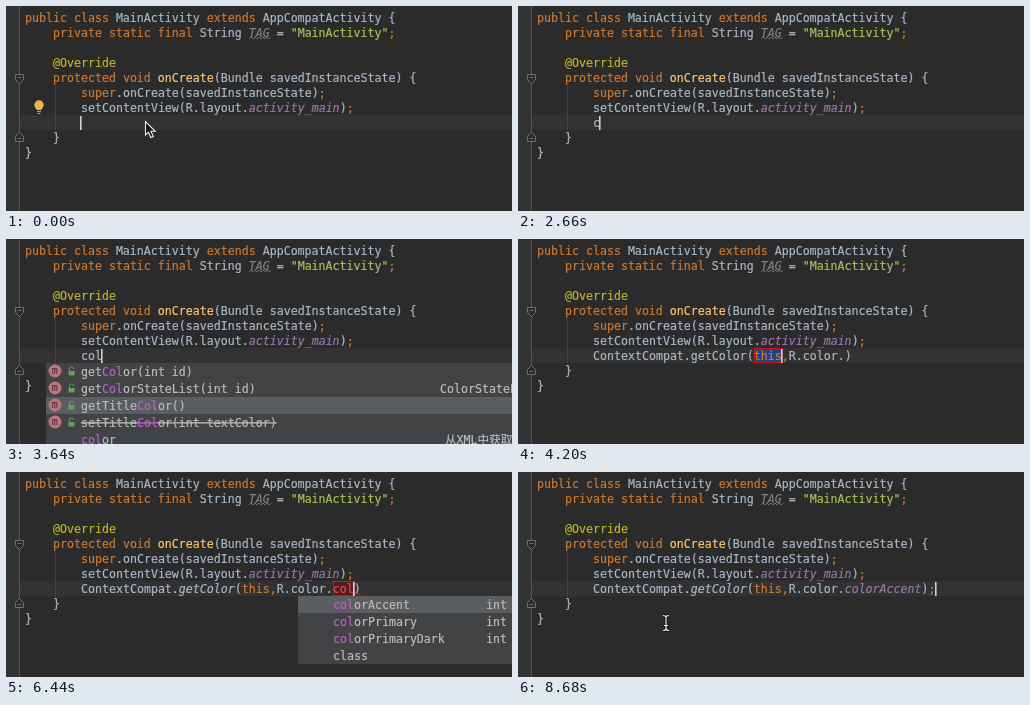
Animation, 506 px wide and 205 px high, one loop 8.75 s. Source, as an HTML page:

```html
<!DOCTYPE html>
<html lang="en">
<head>
<meta charset="utf-8">
<title>Code completion</title>
<style>
html, body { margin: 0; width: 100%; height: 100%; overflow: hidden; background: #2b2b2b; }
svg { display: block; }
text { font: 11.627px "DejaVu Sans Mono", "Noto Sans CJK SC", "Noto Sans CJK", monospace; white-space: pre; }
tspan { fill: currentColor; stroke: currentColor; stroke-width: .2; }
.n { color: #a9b7c6; }
.k { color: #cc7832; }
.m { color: #ffc66d; }
.a { color: #bbb529; }
.s { color: #a5c25c; }
.f { color: #9876aa; font-style: italic; }
.u { color: #808187; font-style: italic; }
.i { color: #a9b7c6; font-style: italic; }
.e { color: #d0504c; }
.d { color: #8d7a93; font-style: italic; }
.p { color: #bbbbbb; }
.h { color: #b964c4; }
.x { text-decoration: line-through; }
</style>
</head>
<body>
<svg width="506" height="205" viewBox="0 0 506 205">
  <path fill="#313335" d="M0 0h13v205H0z"/>
  <path fill="#323232" d="M0 109h506v15H0z"/>
  <path stroke="#555" d="M13.5 0v205"/>
  <path stroke="#414141" d="M49.5 80v44"/>
  <g fill="#2b2b2b" stroke="#707070">
    <path d="M9.5 68.5h8v5l-4 4l-4-4zM11.5 71.5h4"/>
    <path d="M9.5 135.500h8v-5l-4-4l-4 4zM11.5 132.500h4"/>
  </g>
  <g id="code"></g>
  <g id="live"></g>
</svg>
<script>
const LOOP = 8750, STEP = 70, CHAR = 7, LEFT = 75, BASE = 121;
const code = document.getElementById("code"), live = document.getElementById("live");

// Styled text: class, string, class, string, ...
function text(x, y, ...runs) {
  let out = "";
  for (let i = 0; i < runs.length; i += 2) out += `<tspan class="${runs[i]}">${runs[i + 1]}</tspan>`;
  return `<text x="${x}" y="${y}">${out}</text>`;
}
const line = (row, indent, ...runs) => text(19 + indent * CHAR, 16 + row * 15, ...runs);
const rect = (x, y, w, h, fill, more = "") =>
  `<rect x="${x}" y="${y}" width="${w}" height="${h}" fill="${fill}" ${more}/>`;
const column = n => LEFT + n * CHAR;
const field = (from, to, fill) =>
  rect(column(from) + .5, 109.5, (to - from) * CHAR, 14, fill, 'stroke="#c8141e"');
const caret = n => rect(column(n) - 1, 110, 1.6, 14, "#d0d0d0");

function wave(x, y, width, color) {
  let d = `M${x} ${y}`;
  for (let i = 0; i < width / 2; i++) d += `l2 ${i % 2 ? 2 : -2}`;
  return `<path d="${d}" fill="none" stroke="${color}" stroke-width=".9"/>`;
}

code.innerHTML =
  line(0, 0, "k", "public class ", "n", "MainActivity ", "k", "extends ", "n", "AppCompatActivity {") +
  line(1, 4, "k", "private static final ", "n", "String ", "u", "TAG", "n", " = ", "s", '"MainActivity"', "k", ";") +
  wave(243, 33, 22, "#77787c") +
  line(3, 4, "a", "@Override") +
  line(4, 4, "k", "protected void ", "m", "onCreate", "n", "(Bundle savedInstanceState) {") +
  line(5, 8, "k", "super", "n", ".onCreate(savedInstanceState)", "k", ";") +
  line(6, 8, "n", "setContentView(R.layout.", "f", "activity_main", "n", ")", "k", ";") +
  line(8, 4, "n", "}") +
  line(9, 0, "n", "}");

const bulb = `<circle cx="33" cy="99" r="4.700" fill="#f2b24c"/><path fill="#f2b24c" d="M30.500 101h5v3h-5z"/>
  <path stroke="#a5a5a5" d="M31 105.500h4M31.500 107.500h3"/>`;
const arrow = (x, y) => `<path transform="translate(${x} ${y})" d="M.5 .5v13.500l3-2.800l2.300 5.300l2.500-1l-2.300-5.200h4.200z"
  fill="#111" stroke="#eee" stroke-width="1.100"/>`;
const beam = (x, y) => `<g transform="translate(${x} ${y})" fill="none">
  ${["#111", "#eee"].map((c, i) => `<path stroke="${c}" stroke-width="${i ? 1.2 : 3}"
  d="M-3 -7.500q3 0 3 2v11q0 2-3 2M3 -7.500q-3 0-3 2v11q0 2 3 2M-2 2.500h4"/>`).join("")}</g>`;

const methods = [
  ["get", "Col", "or(int id)", ""],
  ["get", "Col", "orStateList(int id)", "ColorStateList"],
  ["getTitle", "Col", "or()", ""],
  ["setTitle", "Col", "or(int textColor)", "", "x"],
  ["", "col", "or", "从XML中获取颜色"]
];

function methodIcon(y) {
  return `<circle cx="49" cy="${y}" r="6.500" fill="#bd7480"/>
    <text x="45.800" y="${y + 3}" style="font-size:10px" fill="#3a2a2d">m</text>
    ${rect(62.5, y, 6, 4.5, "#62a05c")}
    <path d="M63.500 ${y}v-2q0-2 2-2t2 2" fill="none" stroke="#62a05c"/>`;
}

function popup(x, items, selected, icons) {
  let out = rect(x, 124, 506 - x, items.length * 17, "#414345");
  items.forEach(([before, match, after, note, mark = ""], i) => {
    const top = 124 + i * 17;
    if (i === selected) out += rect(x, top, 506 - x, 17, "#5b5e60");
    if (icons && i < 4) out += methodIcon(top + 8);
    out += text(x + 35, top + 12.5, "p " + mark, before, "h " + mark, match, "p " + mark, after);
    if (note) out += text(note[0] === "C" ? 434 : icons ? 439 : 480, top + 12.5, "p", note);
  });
  return out;
}

function opening(t) {
  const p = Math.min(1, Math.max(0, (t - 980) / 420)), s = p * p * (3 - 2 * p);
  const lit = t < 140 || (t >= 700 && t < 1260) || t >= 1750;
  return (t < 1820 ? bulb + arrow(139 - 35 * s, 115 - 9 * s) : "") + (lit ? caret(0) : "");
}

function search(t) {
  const word = t < 2800 ? "c" : t < 3080 ? "co" : "col";
  const picked = [3360, 3640, 3920, 4060].filter(at => t >= at).length;
  return text(LEFT, BASE, "n", word) + caret(word.length) +
    (t >= 2870 ? popup(40, methods, picked, true) : "");
}

function template(t) {
  const word = t < 5880 ? "" : t < 6160 ? "c" : t < 6370 ? "co" : t < 6720 ? "col" : "colorAccent";
  const end = 36 + word.length, filled = t >= 6720, done = t >= 7280, closed = t >= 7980;
  let out = "";
  if (t < 4900) out += field(23, 27, "#214283");
  else if (!done) out += field(36, end, filled ? "#3a3336" : "#5a1a1e");
  out += text(LEFT, BASE, "n", "ContextCompat.", t < 4550 ? "n" : "i", "getColor", "n", "(",
    "k", "this,", "n", "R.color.", done ? "f" : filled ? "d" : "e", word, "n", ")", "k", closed ? ";" : "");
  if (t >= 4550 && t < 8400) {
    const at = closed ? 49 : filled ? 48 : end;
    out += wave(column(at) + 1, 123, 6, filled ? "#74413c" : "#a63c38");
  }
  if (t < 4900) out += caret(27);
  else if (t < 5460 || t >= 5880) out += caret(closed ? 49 : done ? 48 : end);
  if (t >= 5950 && t < 6720) {
    const rest = s => ["", word, s.slice(word.length), "int"];
    out += popup(292, [...["colorAccent", "colorPrimary", "colorPrimaryDark"].map(rest), ["", "", "class", ""]], 0, false);
  }
  if (t >= 8540) {
    const p = (t - 8540) / 140;
    out += beam(105 + 43 * p, 124 + 27 * p);
  }
  return out;
}

let shown = -1;
function draw() {
  const t = Math.floor(performance.now() % LOOP / STEP) * STEP;
  if (t !== shown) {
    shown = t;
    live.innerHTML = t < 2660 ? opening(t) : t < 4200 ? search(t) : template(t);
  }
  requestAnimationFrame(draw);
}
draw();
</script>
</body>
</html>
```
